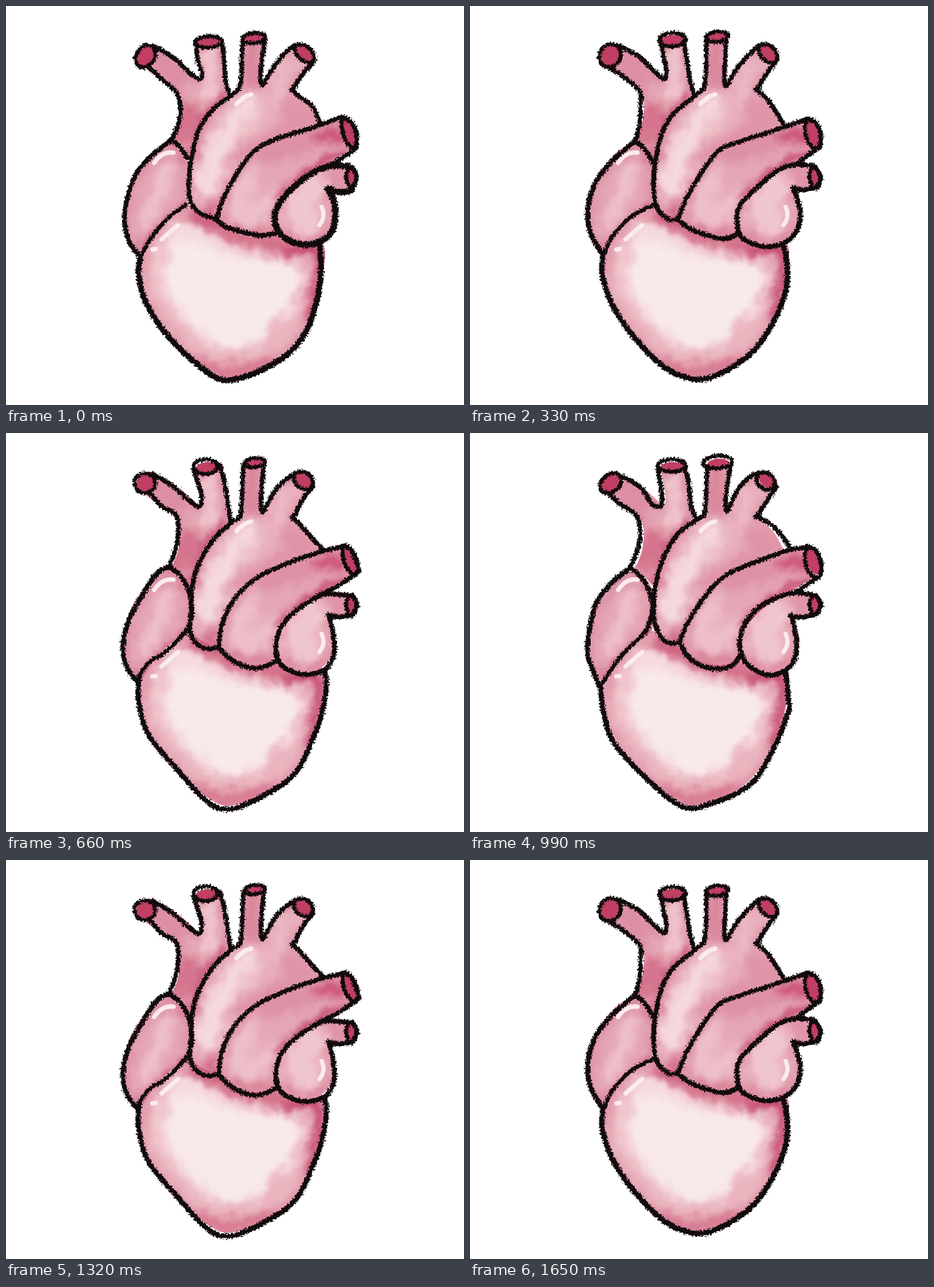
Write an HTML page that moves like this. It is 801x699 px and loops after 1.98 s.

```html
<!DOCTYPE html>
<html lang="en">
<head>
<meta charset="utf-8">
<title>Heart</title>
<style>
html, body { margin: 0; width: 100%; height: 100%; overflow: hidden; background: #fff; }
svg { display: block; width: 801px; height: 699px; }
</style>
</head>
<body>
<svg id="stage" viewBox="0 0 801 699" fill="none" stroke-linecap="round" stroke-linejoin="round">
  <defs>
    <filter id="ink" filterUnits="userSpaceOnUse" x="0" y="0" width="801" height="699" color-interpolation-filters="sRGB">
      <feTurbulence type="fractalNoise" baseFrequency=".34" numOctaves="2" seed="4"/>
      <feDisplacementMap in="SourceGraphic" scale="9" xChannelSelector="R" yChannelSelector="G"/>
    </filter>
    <filter id="paint" filterUnits="userSpaceOnUse" x="0" y="0" width="801" height="699" color-interpolation-filters="sRGB">
      <feGaussianBlur in="SourceGraphic" stdDeviation="8" result="soft"/>
      <feTurbulence type="fractalNoise" baseFrequency=".035" numOctaves="3" seed="9"/>
      <feDisplacementMap in="soft" scale="26" xChannelSelector="R" yChannelSelector="G"/>
    </filter>
  </defs>
  <g id="fills"></g>
  <g id="shine" stroke="#faebec" stroke-width="7.5">
    <path d="M403 172Q415 158 429 155M259 275Q273 254 293 257M272 409Q285 397 301 384M256 426.500L262 425.500M552 352Q560 370 548 384"/>
  </g>
</svg>
<script>
const HOLD = 330, ORDER = [0, 1, 2, 3, 2, 1];
const stage = document.getElementById('stage');
const fills = document.getElementById('fills');

function add(parent, tag, attrs) {
  const node = document.createElementNS('http://www.w3.org/2000/svg', tag);
  for (const key in attrs) node.setAttribute(key, attrs[key]);
  return parent.appendChild(node);
}

// Smooth curve through points; a repeated point makes a corner.
function curve(text, closed) {
  const p = text.split(' ').map(s => s.split(',').map(Number)), n = p.length;
  const at = i => closed ? p[(i + n) % n] : p[Math.max(0, Math.min(n - 1, i))];
  let d = 'M' + p[0];
  for (let i = 0; i < (closed ? n : n - 1); i++) {
    const [a, b, c, e] = [at(i - 1), at(i), at(i + 1), at(i + 2)];
    const c1 = b.map((v, k) => v + (c[k] - a[k]) / 6);
    const c2 = c.map((v, k) => v - (e[k] - b[k]) / 6);
    d += `C${c1} ${c2} ${c}`;
  }
  return d + (closed ? 'Z' : '');
}

// A painted area: flat base, darker rim, then soft brush strokes [points, colour, width].
function area(id, outline, base, rim, strokes) {
  const d = curve(outline, true);
  add(add(fills, 'clipPath', { id }), 'path', { d });
  const g = add(fills, 'g', { 'clip-path': `url(#${id})` });
  add(g, 'path', { d, fill: base });
  const soft = add(g, 'g', { filter: 'url(#paint)' });
  add(soft, 'path', { d, stroke: rim, 'stroke-width': 18, opacity: .75 });
  for (const [points, stroke, width] of strokes)
    add(soft, 'path', { d: curve(points), stroke, 'stroke-width': width });
}

const DEEP = '#c2446a', DARK = '#d4728b', MID = '#e2a0b0', PALE = '#f0c6cd', MILK = '#f8e9ea';

area('ventricle', '318,348 275,378 238,430 232,475 247,530 300,597 345,634 385,653 440,640 485,612 530,555 550,490 552,412 470,390 370,360', '#eab4bf', '#dd8ca0', [
  ['330,365 390,395 460,412 535,425', DARK, 34],
  ['340,364 370,374', DEEP, 9],
  ['490,432 540,430 546,480 532,540', DEEP, 17],
  ['340,628 390,640 460,622', DARK, 18],
  ['310,410 285,455 310,515 395,575 465,530 490,480', PALE, 64],
  ['318,430 310,480 350,540 400,570 450,530 480,480 420,468 360,440', MILK, 62],
  ['350,470 390,520 440,500', MILK, 70],
  ['295,405 330,395 370,420', '#f5d9dd', 26]
]);
area('cava', '258,69 258,69 300,94 339,129 339,129 342,112 333,62 333,62 377,60 377,60 383,110 392,156 392,156 345,205 322,270 322,270 290,235 290,235 302,200 298,152 240,106 240,106 230,88', '#e4a6b4', '#da899e', [
  ['262,92 305,128', '#dc8da1', 24],
  ['350,85 362,135 340,160', PALE, 24],
  ['325,180 305,225', DARK, 30],
  ['383,164 345,200 324,258', DEEP, 13]
]);
area('aorta', '414,56 414,56 452,57 452,57 448,137 448,137 475,96 507,68 507,68 538,95 538,95 502,148 502,148 530,172 550,207 550,207 550,260 430,380 366,374 366,374 332,356 321,320 325,262 350,196 411,146 411,146 413,100', '#e9b1bd', '#dd8fa2', [
  ['432,70 430,135', '#d9859a', 22],
  ['490,180 525,205 470,230 415,260', '#df95a7', 36],
  ['480,108 475,160', '#ebbac4', 22],
  ['426,172 392,212 368,260 350,315', '#f5d9dd', 38],
  ['425,200 410,225', PALE, 25],
  ['360,186 338,221 327,272', DARK, 8],
  ['400,300 372,350 350,365', DARK, 15],
  ['350,368 370,365', DEEP, 7]
]);
area('atrium', '290,235 290,235 318,272 322,320 318,348 318,348 270,384 234,438 234,438 212,412 206,365 218,308 252,260', '#e4a4b3', '#da8a9f', [
  ['282,284 270,325 242,380', '#eec0c9', 28],
  ['292,242 315,275', DARK, 9],
  ['316,350 270,386 235,426', DEEP, 9],
  ['218,330 212,380', '#df95a7', 14]
]);
area('pulmonary', '367,374 367,374 395,306 433,255 500,226 588,196 588,196 608,212 612,246 612,246 560,280 500,330 470,400 470,400 430,406 390,393', '#e5a7b5', '#db8da1', [
  ['455,262 525,242', '#dd90a4', 30],
  ['550,230 590,222', '#cc587a', 28],
  ['425,300 405,350 430,370 458,340', '#edbfc8', 36],
  ['590,260 535,287 485,330', DEEP, 14],
  ['390,386 430,400 465,395', DARK, 10]
]);
area('appendage', '604,283 604,283 570,279 520,302 476,348 470,385 492,412 525,420 556,408 574,380 574,350 564,321 564,321 604,322 604,322', '#ebb5c0', '#dc8da1', [
  ['540,312 510,345 525,385', '#f0c6ce', 46],
  ['565,300 596,300', '#df93a6', 22],
  ['485,402 525,412 560,395', DARK, 8]
]);

const ellipse = (parent, text, attrs) => {
  const [cx, cy, rx, ry, turn] = text.split(' ');
  add(parent, 'ellipse', { cx, cy, rx, ry, transform: `rotate(${turn} ${cx} ${cy})`, ...attrs });
};
for (const mouth of ['245 87 16 20 32', '354 61 22 10 -2', '434 54 19 9 -4', '521 83 19 12 40', '600 222 12 26 -17', '604 300 9 17 0'])
  ellipse(fills, mouth, { fill: '#c13f62' });

// Four inked versions of the same drawing.
const poses = ORDER.slice(0, 4).map(() => add(stage, 'g', { stroke: '#120b0d', filter: 'url(#ink)', visibility: 'hidden' }));
const line = (width, ...versions) => versions.forEach((points, i) =>
  add(poses[i], 'path', { d: curve(points), 'stroke-width': Array.isArray(width) ? width[i] : width }));
const rim = (...versions) => versions.forEach((shape, i) => ellipse(poses[i], shape, { 'stroke-width': 7 }));

rim('244 88 16 21 32', '245 87 18 21 30', '243 88 18 17 0', '246 88 21 15 -40');
rim('354 63 23 10 -3', '354 59 23 12 -2', '349 59 21 13 0', '353 57 24 11 0');
rim('434 56 20 9 -4', '432 54 19 9 -6', '435 52 18 8 -5', '433 51 25 11 -4');
rim('522 83 20 12 40', '521 83 19 13 44', '520 83 18 14 35', '517 84 17 14 40');
rim('600 222 11 27 -17', '600 224 13 26 -15', '602 223 11 26 -20', '600 227 13 27 -15');
rim('604 299 9 17 0', '603 301 9 19 -5', '604 301 9 18 0', '603 301 9 17 0');

// right edges of the two side vessels
line(8,
  '588,194 603,203 613,222 612,250', '590,198 603,203 613,222 612,246',
  '593,197 604,206 617,238 614,244', '590,199 605,206 615,232 612,251');
line(7,
  '605,283 613,298 605,324', '603,280 614,300 605,319',
  '604,284 615,301 604,321', '603,284 615,300 603,319');
// two vessels on the left
line(8,
  '250,108 270,126 297,150 305,175 302,205 290,234',
  '243,107 270,125 297,150 298,178 297,205 290,234',
  '252,106 272,128 298,145 301,180 296,205 286,232',
  '240,104 262,124 290,143 298,170 293,205 281,234');
line(8,
  '259,70 295,92 320,116 338,128 343,118 335,95 333,68',
  '262,70 295,88 320,112 340,128 343,112 339,90 332,56',
  '258,72 290,92 320,118 338,129 342,110 336,88 328,64',
  '266,76 298,95 318,124 333,128 336,110 332,85 328,58');
line(8,
  '377,60 381,90 384,130 391,156', '374,62 380,100 385,130 392,156',
  '374,55 383,90 388,125 393,154', '376,62 383,90 387,130 397,152');
// aorta
line(8,
  '414,60 412,100 411,133 400,152 365,178 338,215 328,250 320,300 322,340 338,362 365,372',
  '413,58 413,100 410,140 395,156 355,190 335,225 325,270 321,310 326,350 345,373 362,374',
  '415,56 413,100 410,145 395,156 360,190 335,235 325,275 324,310 322,348 332,368 352,378 370,376',
  '415,58 413,100 411,138 400,150 365,175 340,215 327,255 321,300 324,335 340,364 364,368');
line(8,
  '453,58 447,100 445,130 450,137 463,115 485,85 506,68',
  '448,58 446,100 445,133 450,138 465,112 485,88 507,68',
  '451,55 447,100 446,131 451,136 468,105 485,85 507,70',
  '457,50 450,90 447,130 452,134 465,105 485,80 505,70');
line(8,
  '540,95 520,118 501,146 501,146 513,159 535,175 549,203',
  '537,95 518,120 502,146 502,146 525,170 549,208',
  '537,94 520,115 503,148 503,148 530,178 556,206',
  '536,95 520,118 502,146 502,146 530,163 548,183 560,202');
// pulmonary artery
line(8,
  '369,376 375,350 400,300 433,255 475,232 530,215 588,194',
  '363,374 385,325 430,258 465,240 520,222 590,198',
  '372,375 378,335 400,290 440,253 500,225 555,207 595,198',
  '366,366 385,325 420,275 455,245 510,222 555,206 590,200');
line(8,
  '612,250 575,274 540,290', '612,246 592,261 572,276',
  '617,243 580,268 545,285', '612,251 592,264 570,279');
line(8.5,
  '369,376 385,387 415,396 445,402 472,398',
  '363,374 390,393 420,403 445,408 468,400',
  '372,376 395,398 430,412 455,408 472,400',
  '367,366 380,390 405,408 435,413 460,406 472,390');
// appendage
line([11, 8.5, 8.5, 8.5],
  '600,281 570,280 540,290 500,320 473,355 472,385 490,408 520,418 550,412 570,395 576,365 573,340 563,320 580,326 602,324',
  '600,280 570,278 540,287 500,320 472,350 467,380 475,405 505,420 535,420 560,408 575,385 577,355 566,320 566,320 585,322 605,318',
  '603,285 565,282 545,287 505,313 480,342 472,375 478,402 500,418 530,423 560,413 574,385 572,350 565,320 565,320 585,322 603,320',
  '603,284 570,280 540,287 500,310 476,345 472,375 485,405 520,424 548,418 567,398 571,365 563,322 563,322 585,322 603,318');
// atrium
line(8.5,
  '290,234 255,262 228,293 214,330 207,370 215,412 235,440',
  '290,236 250,270 220,308 206,355 210,395 232,436',
  '285,234 262,248 235,290 214,330 204,375 212,412 230,436',
  '281,236 245,265 220,300 208,350 206,390 226,443');
line(8,
  '290,234 305,248 317,266',
  '290,236 308,254 320,275',
  '285,234 305,250 321,280 325,315 318,342 305,358',
  '281,236 305,260 319,300 312,338 300,356');
// ventricle
line(7,
  '314,349 285,370 255,405 235,440', '322,348 285,367 250,402 232,440',
  '305,358 280,383 250,402 233,425', '300,356 265,390 228,443');
line([10, 9.5, 9, 9],
  '235,440 232,470 245,520 285,580 340,632 380,655 430,645 490,612 525,570 545,510 551,460 549,418',
  '232,440 232,475 255,535 300,595 345,636 395,654 440,643 495,605 530,555 552,500 555,455 548,418',
  '233,425 232,470 250,530 300,590 345,640 380,659 425,648 500,602 535,540 555,480 560,430 553,416',
  '228,443 233,485 250,540 305,602 370,654 420,650 490,616 530,555 556,490 557,465 552,418');

function show(time) {
  const current = ORDER[Math.floor(time / HOLD) % ORDER.length];
  poses.forEach((g, i) => g.setAttribute('visibility', i === current ? 'visible' : 'hidden'));
}

let start;
function tick(now) {
  start ??= now;
  show(now - start);
  requestAnimationFrame(tick);
}
show(0);
requestAnimationFrame(tick);
</script>
</body>
</html>
```
